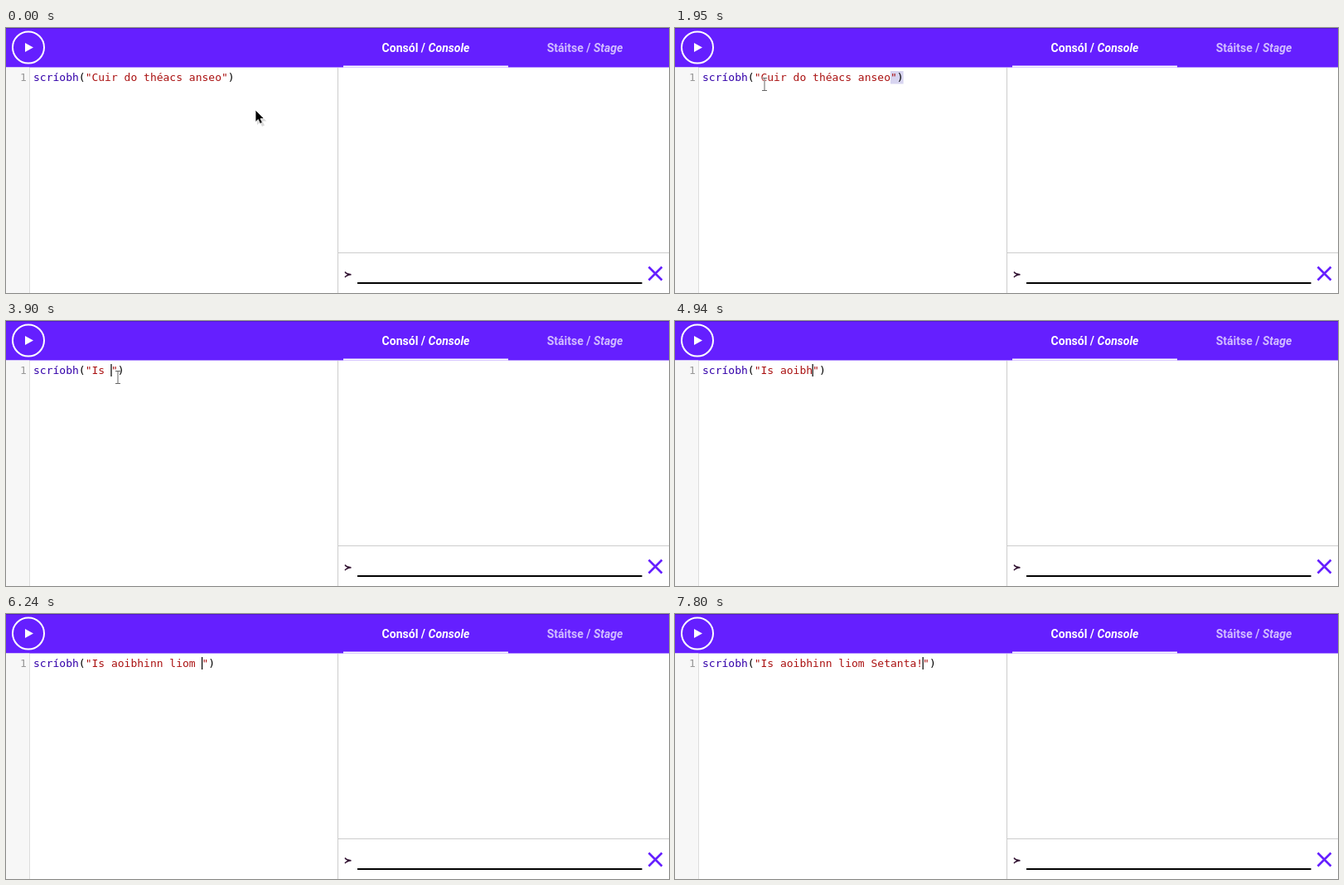
Animation of 800 by 320 pixels, one loop 8000 ms. Source, as an HTML page:

```html
<!DOCTYPE html>
<html lang="ga">
<head>
<meta charset="utf-8">
<style>
html, body { margin: 0; width: 100%; height: 100%; overflow: hidden; background: #fff; }
svg { display: block; }
text { white-space: pre; }
.tab { font: bold 14px Roboto, sans-serif; fill: #fff; text-anchor: middle; }
.code { font: 13px "DejaVu Sans Mono", monospace; }
</style>
</head>
<body>
<svg width="800" height="320" viewBox="0 0 800 320">
  <rect width="800" height="47.5" fill="#651fff"/>
  <rect width="800" height="1" fill="#000" opacity=".2"/>
  <circle cx="27" cy="23.5" r="19" fill="none" stroke="#fff" stroke-width="2"/>
  <path d="M23 18v11l10-5.5z" fill="#fff"/>
  <text class="tab" x="506.5" y="28.5">Consól / <tspan font-style="italic">Console</tspan></text>
  <text class="tab" x="698.5" y="28.5" opacity=".7">Stáitse / <tspan font-style="italic">Stage</tspan></text>
  <rect x="407" y="45.5" width="199" height="2" fill="#fff"/>

  <rect y="47.5" width="28" height="273" fill="#f7f7f7"/>
  <path d="M28.5 48V320" stroke="#ddd"/>
  <path d="M400.5 48V320M400 271.5H800" stroke="#ccc"/>
  <rect x="424" y="307" width="343.5" height="2" fill="#000"/>
  <path d="M409 294.5Q411 297.5 416.5 297.7Q411 298 409 301" fill="none" stroke="#301030" stroke-width="1.5"/>
  <path d="M775.5 288.5l16 16m0-16l-16 16" stroke="#651fff" stroke-width="2.6"/>

  <rect id="sel" y="52" height="15.5" fill="#d7d4f0"/>
  <text class="code" x="17" y="64" fill="#999">1</text>
  <text class="code" x="33" y="64"><tspan fill="#30a">scríobh</tspan>(<tspan id="str" fill="#a11"></tspan>)</text>
  <rect id="caret" y="52" width="1.2" height="15"/>

  <g id="arrow">
    <path d="M2 3v15l3.5-3 2.5 5 3-1.500-2.500-5h5z" opacity=".15"/>
    <path d="M0 0v14.500l3.300-3 2.300 5 2.800-1.300-2.300-4.700h4.400z" stroke="#fff" stroke-width=".8"/>
  </g>
  <g id="beam" fill="none">
    <path d="M-3-7.500H3M0-7.500V7.500M-3 7.500H3" stroke="#fff" stroke-width="2.400" opacity=".7"/>
    <path d="M-3-7.500H3M0-7.500V7.500M-3 7.500H3" stroke="#666"/>
  </g>
</svg>
<script>
const LOOP = 8000, TICK = 130, LEFT = 33, CHAR = 7.826;
const PRESS = 1040, DRAG = 1300, ERASE = 2730, HIDE = 4030;
const before = "Cuir do théacs anseo", after = "Is aoibhinn liom Setanta!";
const first = 9, end = first + before.length;   // columns inside the quotes

// [time, x, y] and [time, typed characters]
const mouse = [[0, 301, 99], [390, 284, 78], [780, 263, 60], [1300, 262, 60],
  [1950, 108, 68], [2210, 103, 63], [2730, 103, 63], [3120, 135, 68]];
const keys = [[3380, 0], [3510, 1], [3900, 3], [4940, 8], [6240, 17],
  [6500, 18], [7280, 24], [7540, 25]];

const $ = id => document.getElementById(id);
const show = (el, on) => el.setAttribute("visibility", on ? "visible" : "hidden");
const colX = col => LEFT + col * CHAR;

function at(track, t, i) {
  if (t <= track[0][0]) return track[0][i];
  const n = track.findIndex(k => k[0] >= t);
  if (n < 0) return track[track.length - 1][i];
  const a = track[n - 1], b = track[n];
  return a[i] + (b[i] - a[i]) * (t - a[0]) / (b[0] - a[0]);
}

function draw(now) {
  const t = Math.floor(now % LOOP / TICK) * TICK;
  const typed = Math.floor(at(keys, t, 1));
  const x = at(mouse, t, 1), y = at(mouse, t, 2);
  $("str").textContent = `"${t < ERASE ? before : after.slice(0, typed)}"`;

  // dragging below the line selects to its end
  const selecting = t > DRAG && t < ERASE;
  const head = y > 64 ? end + 2 : Math.max(first, Math.round((x - LEFT) / CHAR));
  show($("sel"), selecting);
  $("sel").setAttribute("x", colX(Math.min(head, end)));
  $("sel").setAttribute("width", Math.abs(head - end) * CHAR);

  show($("caret"), t >= PRESS && !selecting);
  $("caret").setAttribute("x", colX(t < ERASE ? end : first + typed) - .5);

  const overText = y < 76;
  show($("arrow"), !overText);
  show($("beam"), overText && t < HIDE);
  for (const id of ["arrow", "beam"]) $(id).setAttribute("transform", `translate(${x} ${y})`);
}

const start = performance.now();
function frame() {
  draw(performance.now() - start);
  requestAnimationFrame(frame);
}
frame();
</script>
</body>
</html>
```
